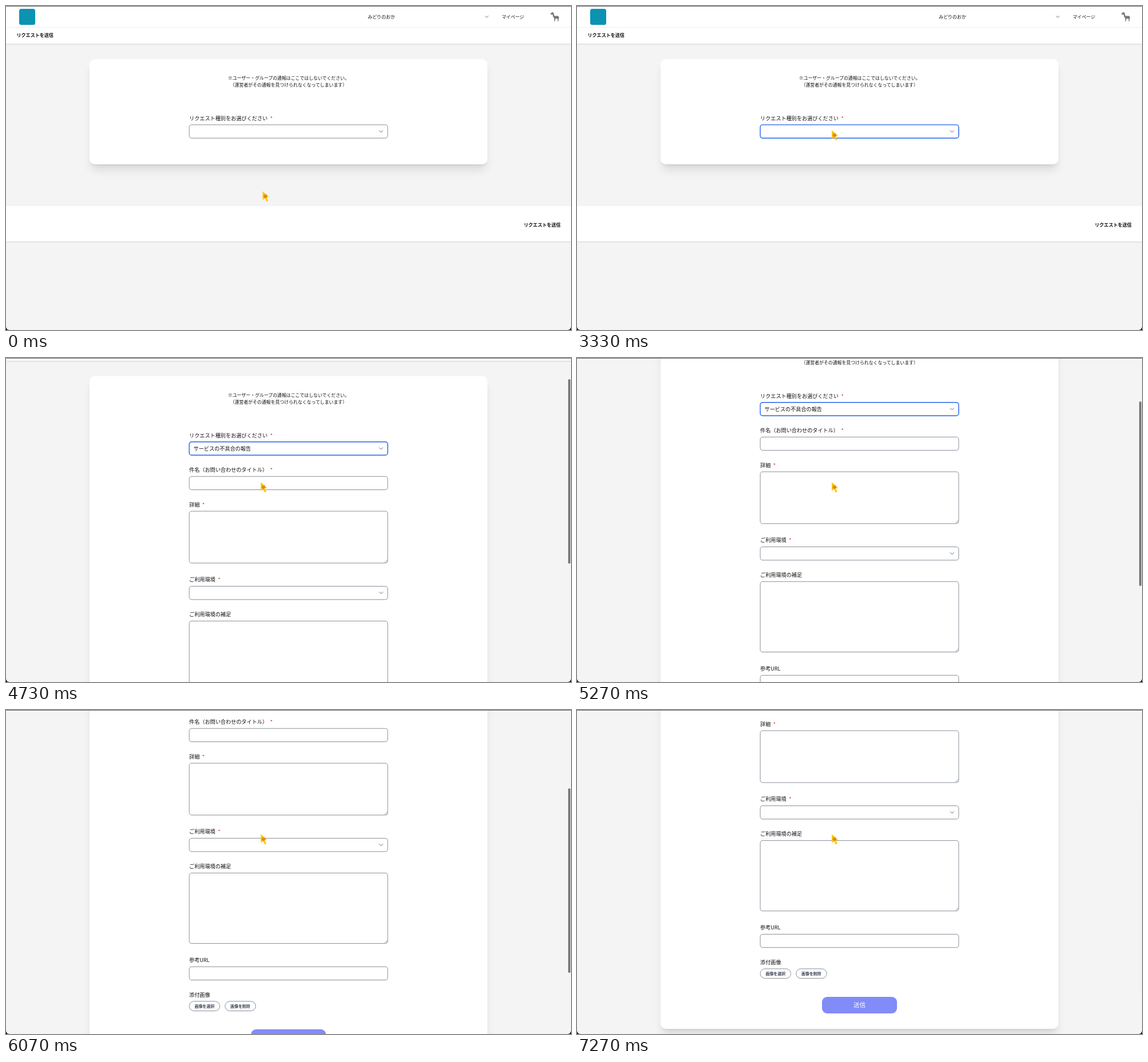
These frames come from a looping animation (987x567 px, 8.29 s). An HTML page:

```html
<!DOCTYPE html>
<html lang="ja">
<head>
<meta charset="utf-8">
<style>
html, body { margin: 0; width: 100%; height: 100%; overflow: hidden; background: #f4f4f4; }
body { position: relative; font-family: "Noto Sans CJK JP", "Noto Sans CJK", sans-serif; color: #111; }
div, svg { position: absolute; box-sizing: border-box; }
#page { left: 0; top: 0; width: 987px; height: 990px; }
.bar { background: #fff; box-shadow: 0 .7px 2px rgba(0,0,0,.14); }
.card { background: #fff; border-radius: 9px;
  box-shadow: 0 13px 16px -3px rgba(0,0,0,.1), 0 5px 6px -4px rgba(0,0,0,.1); }
.field { fill: #fff; stroke: #6b7280; stroke-width: .8; }
.focus { stroke: #2563eb; stroke-width: 1.4; }
.send { background: #818cf8; border-radius: 9px; }
.text { white-space: nowrap; line-height: 20px; }
.text i { font-style: normal; color: #dc2626; margin-left: 4.5px; }
#frame { inset: 0; border-top: 1px solid #666; border-radius: 0 0 6px 6px; box-shadow: 0 0 0 9px #111; }
#thumb { left: 981.5px; width: 4.5px; height: 323px; border-radius: 3px; background: #7b7b7b; }
svg { left: 0; top: 0; overflow: visible; }
</style>
</head>
<body>
<div id="page"></div>
<div id="thumb"></div>
<svg id="cursor" width="12" height="18">
  <path d="M0 0 11 10 7.2 11 9.8 16.6 7 18 4.2 12.4 0 15Z" fill="#fcc812"/>
  <circle cx="4.7" cy="8.3" r="3.4" fill="#f5a21c"/>
  <path d="M3.4 6.8v1.2M6 6.8v1.2M2.7 9.2q2 2.4 4 0" fill="none" stroke="#6b410c" stroke-width=".75"/>
</svg>
<div id="frame"></div>
<script>
const LOOP = 8290, CLICK = 2600, CHOOSE = 3570;
const $ = id => document.getElementById(id);
const page = $('page');

function add(parent, css, cls = '', html = '') {
  const el = document.createElement('div');
  el.style.cssText = css;
  el.className = cls;
  el.innerHTML = html;
  return parent.appendChild(el);
}
const box = (parent, x, y, w, h, cls, css = '') =>
  add(parent, `left:${x}px;top:${y}px;width:${w}px;height:${h}px;${css}`, cls);
// y is the middle of the line
const text = (parent, x, y, size, str, css = '') =>
  add(parent, `left:${x}px;top:${y - 10.5}px;font-size:${size}px;${css}`, 'text', str);
const centred = (parent, x, y, size, str, css = '') =>
  text(parent, x, y, size, str, 'transform:translateX(-50%);' + css);
function drawing(parent, shape) {
  parent.insertAdjacentHTML('beforeend', `<svg width="1" height="1">${shape}</svg>`);
  return parent.lastElementChild.firstElementChild;
}
const stroke = (parent, path, width) => drawing(parent,
  `<path d="${path}" fill="none" stroke="#5f636b" stroke-width="${width}" stroke-linecap="round"/>`);
const outline = (parent, x, y, w, h, r) => drawing(parent,
  `<rect class="field" x="${x}" y="${y}" width="${w}" height="${h}" rx="${r}"/>`);

const label = (parent, y, str, required) =>
  text(parent, 320, y, 9.13, str + (required ? '<i>*</i>' : ''));
const field = (parent, y, h) => outline(parent, 320.1, y + .4, 346.7, h - .7, 4.2);
function select(parent, y) {
  const el = field(parent, y, 24);
  stroke(parent, `M652.2 ${y + 10.5}l3 3 3-3`, 1);
  return el;
}
function textarea(parent, y, h) {
  field(parent, y, h);
  const b = y + h - 1.5;
  stroke(parent, `M661.5 ${b}l4.5-4.5M664 ${b}l2-2`, .6);
}
function pill(parent, x, str) {
  outline(parent, x, 745.9, 53.4, 16.8, 8.4);
  centred(parent, x + 26.7, 754, 6.95, str, bold + 'color:#374151');
}

// Header
const bold = 'font-weight:700;';
box(page, 0, 0, 987, 66, 'bar');
box(page, 0, 37, 987, 1, '', 'background:#efefef');
box(page, 22.5, 5, 28, 28, '', 'background:#0c93b2;border-radius:3.5px');
text(page, 632, 19, 7.95, 'みどりのおか');
stroke(page, 'M837 17.5l2.7 2.7 2.7-2.7', .9);
text(page, 866, 19, 7.85, 'マイページ');
drawing(page, '<path fill="#777" d="M951 13.5l3-2.5 2.5.5 1.5 6 6-.3 2 2 .2 3-.8-1.5-.4 6h-1.2l-.3-4.5-4 0-.4 4.5h-1.2l-.4-5.5-2-3-.6-3.5-3 .3z"/>');
text(page, 18.5, 51.5, 8.05, 'リクエストを送信', bold);

// Card
const card = box(page, 146.3, 93.4, 694.5, 184, 'card');
centred(page, 493.7, 126.5, 7.88, '※ユーザー・グループの通報はここではしないでください。');
centred(page, 493.7, 138, 7.88, '（運営者がその通報を見つけられなくなってしまいます）');
label(page, 196, 'リクエスト種別をお選びください', true);
const kind = select(page, 207.5);

// Shown once a kind is chosen
const form = add(page, 'left:0;top:0');
text(form, 327.5, 219.5, 9.13, 'サービスの不具合の報告');
label(form, 256.5, '件名（お問い合わせのタイトル）', true);
field(form, 268, 24);
label(form, 317, '詳細', true);
textarea(form, 328.8, 91.5);
label(form, 448.5, 'ご利用環境', true);
select(form, 460.2);
label(form, 509.5, 'ご利用環境の補足');
textarea(form, 521, 124);
label(form, 673.5, '参考URL');
field(form, 685, 24);
label(form, 734, '添付画像');
pill(form, 320.1, '画像を選択');
pill(form, 382.7, '画像を削除');
box(form, 428.3, 794.5, 130.5, 29.5, 'send');
centred(form, 493.5, 809.5, 10.4, '送信', 'font-weight:500;color:#fff');

// Footer
const footer = box(page, 0, 350, 987, 62, 'bar');
text(footer, 904.5, 33.5, 8.05, 'リクエストを送信', bold);

const unit = (t, a, b) => Math.min(1, Math.max(0, (t - a) / (b - a)));

// Steady scrolling that slows down over the last stretch
const stops = [[4230, 0], [4330, 12], [4730, 61], [5270, 130], [6070, 236]];
function scrollAt(t) {
  let y = 57 * (1 - (1 - unit(t, 6070, 6700)) ** 1.46);
  for (let i = 1; i < stops.length; i++) {
    const [a, from] = stops[i - 1], [b, to] = stops[i];
    y += (to - from) * unit(t, a, b);
  }
  return y;
}

function draw(now) {
  const t = now % LOOP;
  const open = t >= CHOOSE;
  const y = scrollAt(t);
  const move = 1 - (1 - unit(t, 1900, 2700)) ** 3;
  kind.classList.toggle('focus', t >= CLICK);
  form.style.display = open ? '' : 'none';
  card.style.height = (open ? 758 : 184) + 'px';
  footer.style.top = (open ? 924 : 350) + 'px';
  page.style.transform = `translateY(${-y}px)`;
  $('thumb').style.top = 2 + .572 * y + 'px';
  $('thumb').style.opacity = t < 4230 ? 0 : 1 - .98 * unit(t, 7110, 7270);
  $('cursor').style.transform = `translate(${448.3 - 3.3 * move}px, ${324.3 - 107 * move}px)`;
}
const start = performance.now();
function tick() {
  draw(performance.now() - start);
  requestAnimationFrame(tick);
}
tick();
</script>
</body>
</html>
```
